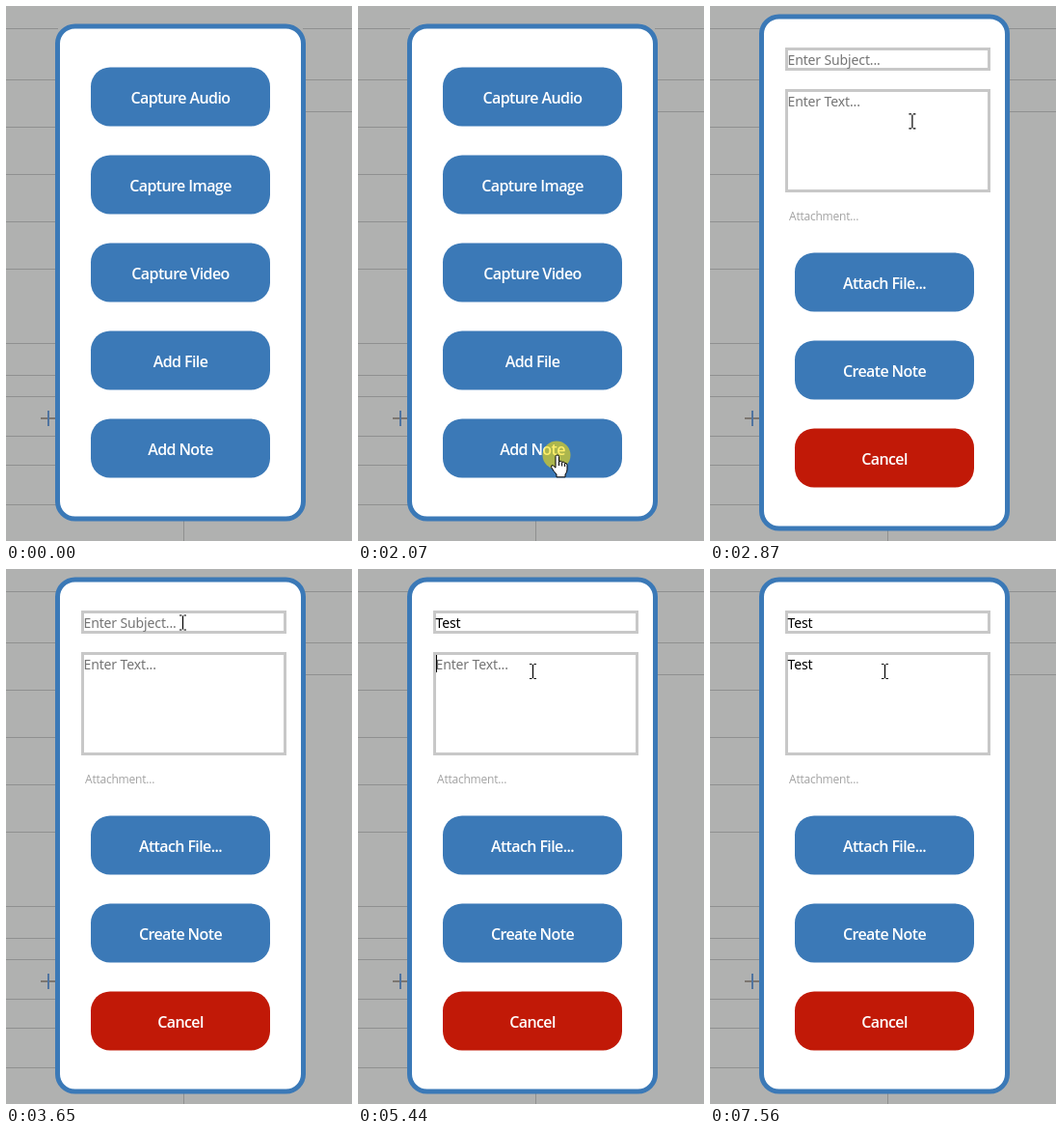
Animation of 359x554 px, one loop 8000 ms. Source, as an HTML page:

```html
<!DOCTYPE html>
<html lang="en">
<head>
<meta charset="utf-8">
<title>Add a note</title>
<style>
  html, body { margin: 0; width: 100%; height: 100%; overflow: hidden; background: #b0b1b0; }
  svg { display: block; width: 100%; height: 100%; }
  .label { font: 600 16px "Open Sans", "Noto Sans", sans-serif; letter-spacing: -.6px; fill: #fff; text-anchor: middle; }
  .field { font: 14px "Noto Sans", "Open Sans", sans-serif; letter-spacing: -.13px; }
  .hint { font: 12px "Open Sans", "Noto Sans", sans-serif; letter-spacing: -.2px; fill: #a2a2a2; }
</style>
</head>
<body>
<svg id="stage" viewBox="0 0 359 554"></svg>
<script>
const LOOP = 8000;
const BLUE = "#3b79b7", RED = "#c11907";
const WORD = "Test";
const CARET_X = [81, 89, 97, 103, 107];

const rect = (x, y, w, h, attrs) =>
  `<rect x="${x}" y="${y}" width="${w}" height="${h}" ${attrs}/>`;

const dialog = (y, h) =>
  rect(53.5, y + 2.5, 255, h - 5, `rx="18" fill="#fff" stroke="${BLUE}" stroke-width="5"`);

const button = (y, text, fill = BLUE) =>
  rect(88, y, 186, 61, `rx="20" fill="${fill}"`) +
  `<text class="label" x="181" y="${y + 37.5}">${text}</text>`;

const box = (y, h) =>
  rect(79.5, y + 1.5, 210, h - 3, `fill="#fff" stroke="#c8c8c8" stroke-width="3"`);

function background() {
  const left = [23, 76, 125, 174, 223, 272, 349, 382, 404, 445, 475, 516];
  const right = [23, 76, 109];
  const lines = left.map(y => `M0 ${y}.5H54`).concat(right.map(y => `M308 ${y}.5H359`)).join("");
  return rect(0, 0, 359, 554, `fill="#b0b1b0"`) +
    `<path d="${lines}M184.5 530V554" stroke="#8f9090"/>` +
    `<path d="M36 427H52" stroke="#7c7670" stroke-width="2"/>` +
    `<path d="M44 419V435" stroke="#4f74a0" stroke-width="2"/>`;
}

const input = (id, baseline, caretY) =>
  `<text id="${id}Text" class="field" x="80.5" y="${baseline}"></text>` +
  rect(81, caretY, 1, 18, `id="${id}Caret"`);

const stage = document.getElementById("stage");
stage.innerHTML = background() +
  `<g id="menu">` + dialog(18.5, 515) +
  ["Capture Audio", "Capture Image", "Capture Video", "Add File", "Add Note"]
    .map((text, i) => button(63.5 + 91 * i, text)).join("") + `</g>` +
  `<g id="form">` + dialog(8.5, 535) +
  box(43, 24) + input("subject", 61, 46) +
  box(86, 107) + input("body", 104, 89) +
  `<text class="hint" x="82" y="222">Attachment...</text>` +
  button(255.5, "Attach File...") + button(346.5, "Create Note") + button(437.5, "Cancel", RED) + `</g>` +
  `<circle id="ring" r="14.5" fill="#ffe200" fill-opacity=".58"/>` +
  `<g id="arrow"><path d="M.5 .5V16.5L4.2 13L6.8 18.8L9 17.8L6.5 12.2H11.7Z" fill="#fff" stroke="#000"/></g>` +
  `<g id="hand" stroke="#000" stroke-linejoin="round">` +
  `<path fill="#fff" d="M-1 1.6Q-1 0 .8 0Q2.5 0 2.5 1.6V6.5Q5.3 5.5 5.6 7.3Q8.2 6.4 8.6 8.3Q11 8 11 10.5V15Q11 18 9 20V22.8H0V20Q-3 17-5.5 12.5Q-5.8 9.8-3.3 11L-1 13.2Z"/>` +
  `<path fill="none" d="M2.5 6.5V11M5.6 7.5V11.5M8.6 8.5V12"/></g>` +
  `<g id="beam"><path d="M-3 -7.5H-.5M1.5 -7.5H4M-3 7.5H-.5M1.5 7.5H4M.5 -7V7" fill="none" stroke="#000" stroke-width="1.2"/></g>`;

const el = {};
stage.querySelectorAll("[id]").forEach(node => el[node.id] = node);

const show = (node, on) => node.setAttribute("visibility", on ? "visible" : "hidden");
const within = (t, a, b) => t >= a && t < b;
const clamp = u => Math.max(0, Math.min(1, u));
const easeOut = u => 1 - (1 - u) ** 2;
const smooth = u => u * u * (3 - 2 * u);

const stepAt = (t, start, end, count) => Math.floor((t - start) / (end - start) * (count - 1) + 1e-6);

const curve = (a, c, b, u) =>
  a.map((p, i) => (1 - u) ** 2 * p + 2 * u * (1 - u) * c[i] + u * u * b[i]);

const ENTRY = [306, 482], BUTTON = [206, 465], SUBJECT = [183, 55.5], BODY = [181, 106];

function pointer(t) {
  if (t < 2480) return curve(ENTRY, [245, 477], BUTTON, easeOut(clamp(stepAt(t, 1130, 1540, 6) / 5)));
  if (t < 5130) return curve(BUTTON, [281, 260], SUBJECT, smooth(clamp((stepAt(t, 2480, 3180, 10) + 1) / 8)));
  return curve(SUBJECT, [182, 80], BODY, smooth(clamp((stepAt(t, 5130, 5440, 5) + 1) / 3)));
}

function pointerKind(x, y, formOpen) {
  const tops = formOpen ? [255.5, 346.5, 437.5] : [63.5, 154.5, 245.5, 336.5, 427.5];
  if (within(x, 88, 274) && tops.some(top => within(y, top, top + 61))) return "hand";
  if (formOpen && within(x, 78, 291) && (within(y, 43, 67) || within(y, 86, 193))) return "beam";
  return "arrow";
}

function typeInto(id, t, keys, hint, caretOn) {
  const typed = keys.filter(k => t >= k).length;
  const text = el[id + "Text"];
  text.textContent = typed ? WORD.slice(0, typed) : hint;
  text.setAttribute("fill", typed ? "#000" : "#757575");
  el[id + "Caret"].setAttribute("x", CARET_X[typed]);
  show(el[id + "Caret"], caretOn);
}

function render(t) {
  const formOpen = t >= 2160;
  show(el.menu, !formOpen);
  el.form.style.display = formOpen ? "" : "none";

  typeInto("subject", t, [3880, 4110, 4340, 4420], "Enter Subject...",
    within(t, 3180, 3650) || within(t, 3880, 4880));
  typeInto("body", t, [6310, 6700, 6950, 7010], "Enter Text...",
    within(t, 5440, 5910) || within(t, 6310, 7560));

  const [x, y] = pointer(t);
  const kind = pointerKind(x, y, formOpen);
  for (const name of ["arrow", "hand", "beam"]) {
    show(el[name], t >= 1130 && name === kind);
    el[name].setAttribute("transform", `translate(${x} ${y})`);
  }
  el.ring.setAttribute("cx", x);
  el.ring.setAttribute("cy", y);
  show(el.ring, within(t, 2070, 2160) || within(t, 3102, 3180) || within(t, 5362, 5440));
}

const start = performance.now();
function tick() {
  render((performance.now() - start) % LOOP);
  requestAnimationFrame(tick);
}
tick();
</script>
</body>
</html>
```
